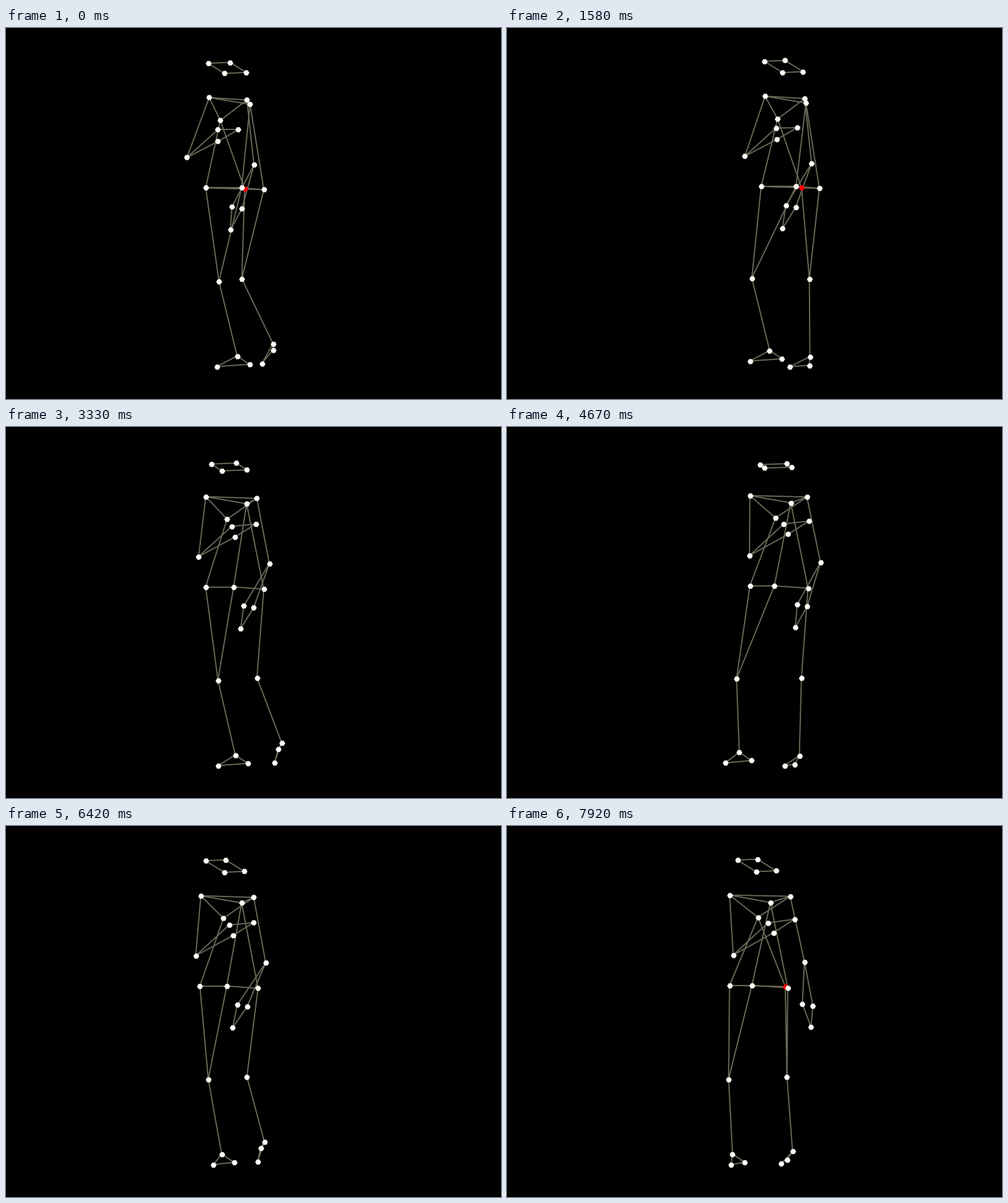
Recreate the animation shown at these times as a matplotlib script. Size 800x600 px, loop 8000 ms.

```python
import numpy as np
import matplotlib.pyplot as plt
from matplotlib.animation import FuncAnimation
from matplotlib.collections import LineCollection

W, H, DPI = 800, 600, 100
FRAMES, INTERVAL = 200, 40
RATE = 12        # poses per second, each one held until the next
LEAD = .08       # the hips run this far ahead of the shoulders, in seconds


def ease(t, keys):
    """Glide from key to key, coming to rest at each one."""
    for (t0, v0), (t1, v1) in zip(keys, keys[1:]):
        if t <= t1:
            break
    s = np.clip((t - t0) / (t1 - t0), 0, 1)
    return v0 + (v1 - v0) * s * s * (3 - 2 * s)


def line(t, keys):
    return np.interp(t, *zip(*keys))


# Keys are (seconds, value)
SWAY = [(-1.3, 420), (.12, 326), (1.47, 418), (3.1, 319), (4.95, 397), (6.2, 313), (8.5, 368)]
TURN = [(0, 0), (1.58, .08), (2.33, .05), (3.33, .58), (4.67, .84), (6.42, .66), (7.92, 1)]
HEAD_YAW = [(0, .63), (1.58, .72), (2.33, .69), (3.33, .4), (4.67, .18), (6.42, .75), (7.92, .75)]
FLING = [(0, .14), (2.33, -.07), (4.67, .09), (6.42, -.13), (7.62, 1.37), (7.95, .98)]
LEFT_STEP = [(.9, 373), (1.58, 424), (2.33, 370), (4.5, 370), (5.1, 396), (5.7, 349),
             (6.42, 348), (7.92, 364)]
RIGHT_STEP = [(0, 431), (.85, 489), (1.9, 489), (3.33, 445), (4.1, 472), (5.5, 472),
              (6.42, 417), (7.7, 461)]

# Offset from the swaying shoulder: x, x per turn, y, y per turn
UPPER = {
    "l_sho": (0, 0, 111, 0), "r_sho": (61, 37, 115, -2),
    "neck": (66, 0, 122, 1), "chest": (18, 28, 148, -1),
    "l_elb": (-36, 42, 208, 0), "l_wra": (14, 48, 163, -7),
    "l_wrb": (14, 57, 182, -10), "l_fin": (47, 58, 163, -13),
}
LOWER = {
    "r_elb": (74, 45, 220, -1), "l_hip": (-4, 2, 257, 0), "sacrum": (54, -20, 257, 0),
    "front": (59, 29, 259, 0), "r_hip": (90, 2, 260, 1),
}
# Offset from the right elbow: x, x per fling, y
FOREARM = {"r_wra": (-41, 38, 68), "r_wrb": (-25, 39, 71), "r_fin": (-46, 57, 105)}

CHAINS = [
    "head_a head_b head_c head_d head_a",
    "neck l_sho r_sho neck", "l_sho chest r_sho",
    "chest l_hip sacrum r_hip neck sacrum",
    "l_sho l_elb l_wra l_fin l_wrb l_elb",
    "r_sho r_elb r_wra r_fin r_wrb r_elb",
    "l_hip l_knee sacrum", "r_hip r_knee",
    "l_knee l_ank l_toe l_heel l_ank",
    "r_knee r_ank r_toe r_heel r_ank",
    "l_hip front r_hip", "chest front r_knee",
]
BONES = [pair for c in CHAINS for pair in zip(c.split(), c.split()[1:])]


def pose(t):
    sway, hips = ease(t, SWAY), ease(t + LEAD, SWAY)
    turn, fling = line(t, TURN), ease(t, FLING)
    bob = (367 - sway) / 40
    p = {}

    for base, joints in ((sway, UPPER), (hips, LOWER)):
        for name, (x, kx, y, ky) in joints.items():
            p[name] = np.array([base + x + kx * turn, y + ky * turn + bob])
    for name, (x, kx, y) in FOREARM.items():
        p[name] = p["r_elb"] + (x + kx * fling, y)

    # The head band is a square ring turning about its middle
    yaw = line(t, HEAD_YAW)
    mid = np.array([sway + 29 + 15 * turn, 63 + bob])
    wide = np.array([44 * np.cos(yaw), -1.5])
    deep = np.array([44 * np.sin(yaw), 26 * np.sin(yaw) + 1])
    for name, u, v in (("a", -1, -1), ("b", 1, -1), ("c", 1, 1), ("d", -1, 1)):
        p["head_" + name] = mid + (u * wide + v * deep) / 2

    # Each foot lifts while the body leans away from it
    lift = np.clip((sway - 372) / 40, 0, 1)
    p["l_ank"] = np.array([ease(t, LEFT_STEP), 530 - 9 * lift])
    p["l_toe"] = p["l_ank"] + (31 * (t / 8) ** 2 - 33, 17)
    p["l_heel"] = p["l_ank"] + (20, 13.5)
    p["l_knee"] = np.array([(p["l_hip"][0] + p["l_ank"][0]) / 2 - 4 - 18 * lift,
                            409 - 5 * lift])

    lift = np.clip((372 - hips) / 45, 0, 1)
    p["r_ank"] = np.array([ease(t, RIGHT_STEP), 531 - 21 * lift])
    p["r_toe"] = p["r_ank"] + (11 * turn + 15 * lift - 33, 16 + 16 * lift)
    p["r_heel"] = p["r_ank"] + (-9 * turn, 14 - 4 * lift)
    bend = (9 + 34 * lift) * (1 - .7 * turn)
    p["r_knee"] = np.array([(p["r_hip"][0] + p["r_ank"][0]) / 2 - bend, 405])
    return p


fig = plt.figure(figsize=(W / DPI, H / DPI), dpi=DPI, facecolor="black")
ax = fig.add_axes([0, 0, 1, 1])
ax.set_xlim(-.5, W - .5)
ax.set_ylim(H - .5, -.5)
ax.axis("off")

bones = LineCollection([], colors="#6a6a58", linewidths=1.4, zorder=1)
ax.add_collection(bones)
dot = dict(linestyle="none", marker="H", markersize=6.8, markeredgewidth=0)
red, = ax.plot([], [], color="#ff0000", zorder=2, **dot)
white, = ax.plot([], [], color="#fffffa", zorder=3, **dot)


def draw(i):
    t = int((i * INTERVAL + 34) * RATE / 1000) / RATE
    shown = t < 2.9 or t > 7.2
    p = pose(t)
    bones.set_segments([[p[a], p[b]] for a, b in BONES
                        if shown or "front" not in (a, b)])
    front = p.pop("front")
    red.set_data([front[0]], [front[1]])
    red.set_visible(shown)
    white.set_data(*np.array(list(p.values())).T)
    return bones, red, white


anim = FuncAnimation(fig, draw, frames=FRAMES, interval=INTERVAL,
                     init_func=lambda: draw(0), repeat=True, repeat_delay=0)
plt.show()
```
